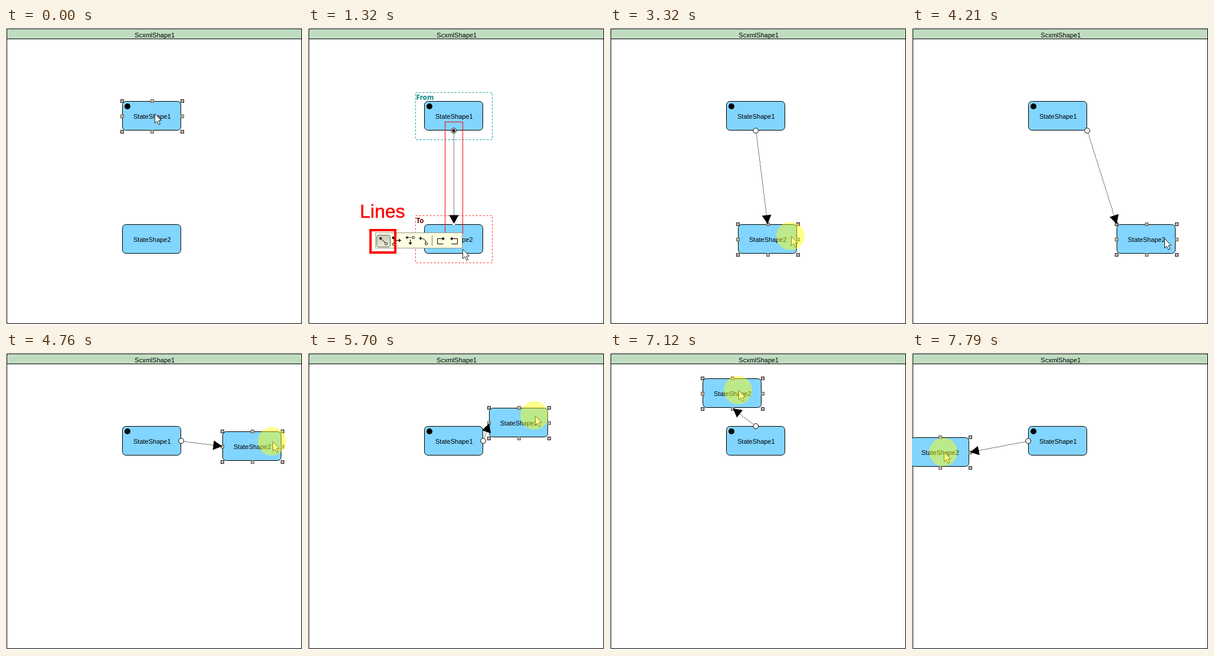
Recreate the animation shown at these times as an HTML page with a canvas. Size 502 by 504 pixels, loop 8000 ms.

```html
<!DOCTYPE html>
<html lang="en">
<head>
<meta charset="utf-8">
<title>Connecting state shapes</title>
<style>
  html, body { margin: 0; width: 100%; height: 100%; overflow: hidden; background: #fff; }
  canvas { display: block; }
</style>
</head>
<body>
<canvas id="stage" width="502" height="504"></canvas>
<script>
const ctx = document.getElementById('stage').getContext('2d');
const LOOP = 8000, STEP = 69, GRID = 10;
const W = 100, H = 50;
const SANS = '"Liberation Sans", Arial, sans-serif';
const BOLD = '"Open Sans", "Noto Sans", sans-serif';
const first = { x: 197, y: 124 };
const secondHome = { x: 197, y: 333 };
const cursorHome = { x: 252, y: 145 };

const smooth = k => k * k * (3 - 2 * k);
const settle = k => 1 - (1 - k) ** 4;
const linear = k => k;
const at = (x, y) => ({ x, y });

// Each gesture moves the cursor, drags the second shape if "shape" is given,
// and holds the button from "press" until "end".
const gestures = [
  { start: 70, end: 330, to: at(321, 121), ease: smooth },
  { start: 470, end: 900, to: at(262, 348), ease: smooth, press: 400 },
  { start: 970, end: 1180, to: at(262, 375), ease: smooth },
  { start: 2640, end: 3000, to: at(283, 353), ease: smooth },
  { start: 3250, end: 3740, to: at(437, 353), shape: at(347, 333), ease: smooth, press: 3070 },
  { start: 3940, end: 4210, to: at(428, 357), ease: smooth },
  { start: 4410, end: 5100, to: at(453, 141), shape: at(367, 123), ease: settle, press: 4340 },
  { start: 5360, end: 6120, to: at(272, 48), shape: at(207, 33), ease: smooth, press: 5360 },
  { start: 6190, end: 6250, to: at(248, 44), shape: at(187, 23), ease: linear, press: 6120 },
  { start: 7050, end: 7530, to: at(54, 168), shape: at(-3, 143), ease: smooth, press: 6650 },
  { start: 7790, end: LOOP, to: at(54, 168), ease: linear, press: 7790 }
];

const mix = (a, b, k) => at(a.x + (b.x - a.x) * k, a.y + (b.y - a.y) * k);

function pose(t) {
  let cursor = cursorHome, shape = secondHome, pressed = false;
  for (const g of gestures) {
    pressed ||= t >= g.press && t < g.end;
    if (t < g.start) continue;
    const steps = Math.round((g.end - g.start) / STEP) + 1;
    const done = t >= g.end ? steps : Math.floor((t - g.start) / STEP) + 1;
    const k = g.ease(Math.min(1, done / steps));
    cursor = mix(cursor, g.to, k);
    if (g.shape) shape = mix(shape, g.shape, k);
  }
  return { cursor, pressed, second: snap(shape) };
}

function snap(p) {
  const to = (v, origin) => origin + Math.round((v - origin) / GRID) * GRID;
  return at(to(p.x, secondHome.x), to(p.y, secondHome.y));
}

function label(text, x, y, { font = `11px ${SANS}`, color = '#000', align = 'center' } = {}) {
  ctx.font = font;
  ctx.fillStyle = color;
  ctx.textAlign = align;
  ctx.fillText(text, x, y);
}

function path(points, close) {
  ctx.beginPath();
  for (const [x, y] of points) ctx.lineTo(x, y);
  if (close) ctx.closePath();
}

function polygon(points, fill) {
  path(points, true);
  ctx.fillStyle = fill;
  ctx.fill();
}

function polyline(points, color = '#000') {
  path(points);
  ctx.strokeStyle = color;
  ctx.stroke();
}

function disc(x, y, r, fill, stroke) {
  ctx.beginPath();
  ctx.arc(x, y, r, 0, Math.PI * 2);
  ctx.fillStyle = fill;
  ctx.fill();
  if (stroke) { ctx.strokeStyle = stroke; ctx.stroke(); }
}

function box(x, y, w, h, color, dash = []) {
  ctx.strokeStyle = color;
  ctx.setLineDash(dash);
  ctx.strokeRect(x + 0.5, y + 0.5, w, h);
  ctx.setLineDash([]);
}

function roundBox(x, y, w, h, r, fill, color) {
  ctx.beginPath();
  ctx.roundRect(x + 0.5, y + 0.5, w, h, r);
  ctx.fillStyle = fill;
  ctx.fill();
  ctx.strokeStyle = color;
  ctx.stroke();
}

function drawPage() {
  ctx.fillStyle = '#fff';
  ctx.fillRect(0, 0, 502, 504);
  ctx.fillStyle = '#c0dcc0';
  ctx.fillRect(1, 1, 500, 17);
  box(1, 1, 500, 500, '#000');
  box(1, 1, 500, 17, '#000');
  label('ScxmlShape1', 252.3, 16);
}

function drawState({ x, y }, text, initial) {
  roundBox(x, y, W - 1, H - 1, 6, '#82d5ff', '#000');
  if (initial) disc(x + 9, y + 9, 5, '#000');
  label(text, x + 50.8, y + 30);
}

function drawHandles({ x, y }) {
  for (let i = 0; i < 9; i++) {
    if (i === 4) continue;
    const hx = x + i % 3 * 51 - 3, hy = y + Math.floor(i / 3) * 26 - 3;
    ctx.fillStyle = '#b8b8b8';
    ctx.fillRect(hx, hy, 6, 6);
    box(hx, hy, 5, 5, i % 2 ? '#6b5a42' : '#222');
  }
}

function dottedLine(a, b) {
  const n = Math.max(Math.abs(b.x - a.x), Math.abs(b.y - a.y));
  ctx.fillStyle = '#000';
  for (let i = 0; i < n; i += 2) {
    const p = mix(a, b, i / n);
    ctx.fillRect(Math.round(p.x), Math.round(p.y), 1, 1);
  }
}

function drawArrow(a, b, selected) {
  dottedLine(a, b);
  ctx.save();
  ctx.translate(b.x + 0.5, b.y + 0.5);
  ctx.rotate(Math.atan2(b.y - a.y, b.x - a.x));
  polygon([[-1, 0], [-16, -8], [-16, 8]], '#000');
  ctx.restore();
  disc(a.x + 0.2, a.y + 0.2, 4.4, '#fff', '#000');
  if (selected) {
    disc(a.x + 0.2, a.y + 0.2, 2.6, '#000');
    ctx.setLineDash([1, 1]);
    disc(b.x + 0.2, b.y, 2.5, '#fff', '#555');
    ctx.setLineDash([]);
  }
}

// Facing sides are joined at their centres, diagonal neighbours at their corners
function anchors(a, b) {
  const overX = b.x < a.x + W && b.x + W > a.x;
  const overY = !overX && b.y < a.y + H && b.y + H > a.y;
  const pick = (over, from, to, size) =>
    over ? [from + size / 2, to + size / 2] : to > from ? [from + size, to] : [from, to + size];
  const [ax, bx] = pick(overX, a.x, b.x, W);
  const [ay, by] = pick(overY, a.y, b.y, H);
  return [at(ax, ay), at(bx, by)];
}

function tip(x, y, dx, dy) {
  const bx = x - dx * 4, by = y - dy * 4;
  polygon([[x, y], [bx - dy * 3, by - dx * 3], [bx + dy * 3, by + dx * 3]], '#000');
}

const ring = (x, y) => disc(x, y, 2, '#fff', '#000');

function drawToolbar() {
  ctx.fillStyle = '#ffffe1';
  ctx.fillRect(114, 347, 147, 26);
  box(114, 347, 147, 26, '#98988c');
  const shade = ctx.createLinearGradient(0, 351, 0, 372);
  shade.addColorStop(0, '#cbc8b6');
  shade.addColorStop(1, '#eeecd8');
  roundBox(116, 351, 23, 20, 3, shade, '#66645c');

  // straight
  polyline([[122, 356], [131, 364]]);
  polygon([[121, 355], [126, 356], [122, 360]], '#000');
  ring(132.5, 366);

  // horizontal and vertical branches
  ctx.fillStyle = '#000';
  ctx.fillRect(143, 354, 4, 4);
  ctx.fillRect(166, 354, 4, 3);
  dottedLine(at(145, 358), at(145, 366));
  dottedLine(at(170, 355), at(178, 355));
  ring(145, 367);
  ring(178.5, 355.5);
  polyline([[148, 360.5], [155, 360.5]]);
  polyline([[173.5, 359], [173.5, 366]]);
  tip(158, 360.5, 1, 0);
  tip(173.5, 368, 0, 1);

  // curve
  ctx.beginPath();
  ctx.moveTo(191, 357);
  ctx.quadraticCurveTo(199, 357, 200, 364);
  ctx.stroke();
  tip(188, 357, -1, 0);
  ring(200.5, 366);

  polyline([[210.5, 352], [210.5, 370]], '#777');

  // loops to the right and to the left
  for (const [x, dir] of [[219.5, 1], [253.5, -1]]) {
    polyline([[x + dir * 10, 366.5], [x, 366.5], [x, 357.5], [x + dir * 9, 357.5]]);
    tip(x + dir * 12.5, 357.5, dir, 0);
  }
}

function drawZone(text, y, dashColor, color) {
  box(182, y, 130, 80, dashColor, [3, 3]);
  label(text, 183.5, y + 13, { font: `bold 11.5px ${BOLD}`, color, align: 'left' });
}

function drawCallout() {
  label('Lines', 88, 322, { font: `32px ${SANS}`, color: '#f00', align: 'left' });
  ctx.strokeStyle = '#f00';
  ctx.lineWidth = 0.5;
  ctx.strokeText('Lines', 88, 322);
  ctx.lineWidth = 4;
  ctx.strokeRect(106, 343, 42, 38);
  ctx.lineWidth = 1;
}

function drawCursor(p, pressed) {
  const x = Math.round(p.x), y = Math.round(p.y);
  ctx.save();
  ctx.translate(x + 0.5, y + 0.5);
  polygon([[0, 0], [0, 16], [3.5, 12.5], [6.5, 18.5], [9, 17.5], [6.3, 11.5], [11, 11.5]], '#fff');
  ctx.strokeStyle = '#222';
  ctx.stroke();
  ctx.restore();
  if (pressed) disc(x - 1, y, 24, 'rgba(255,255,0,0.46)');
}

function draw(t) {
  const { cursor, pressed, second } = pose(t);
  const linking = t >= 400 && t < 900;
  const linkSelected = t >= 900 && t < 2640;

  ctx.lineWidth = 1;
  drawPage();
  drawState(first, 'StateShape1', true);
  drawState(second, 'StateShape2');
  if (t < 400) drawHandles(first);
  if (t >= 3070) drawHandles(second);

  if (linking || linkSelected) drawZone('From', 109, '#00a0a0', '#008080');
  if (linkSelected) drawZone('To', 318, '#ff3030', '#800000');

  if (linking && cursor.y > first.y + H + 16) {
    drawArrow(at(first.x + W / 2, first.y + H), cursor);
  } else if (t >= 900) {
    drawArrow(...anchors(first, second), linkSelected);
  }
  if (linkSelected) {
    box(232, 159, 30, 189, '#f00');
    if (t >= 1040) drawToolbar();
    if (t >= 1320) drawCallout();
  }
  drawCursor(cursor, pressed);
}

function tick() {
  draw(performance.now() % LOOP);
  requestAnimationFrame(tick);
}
tick();
</script>
</body>
</html>
```
